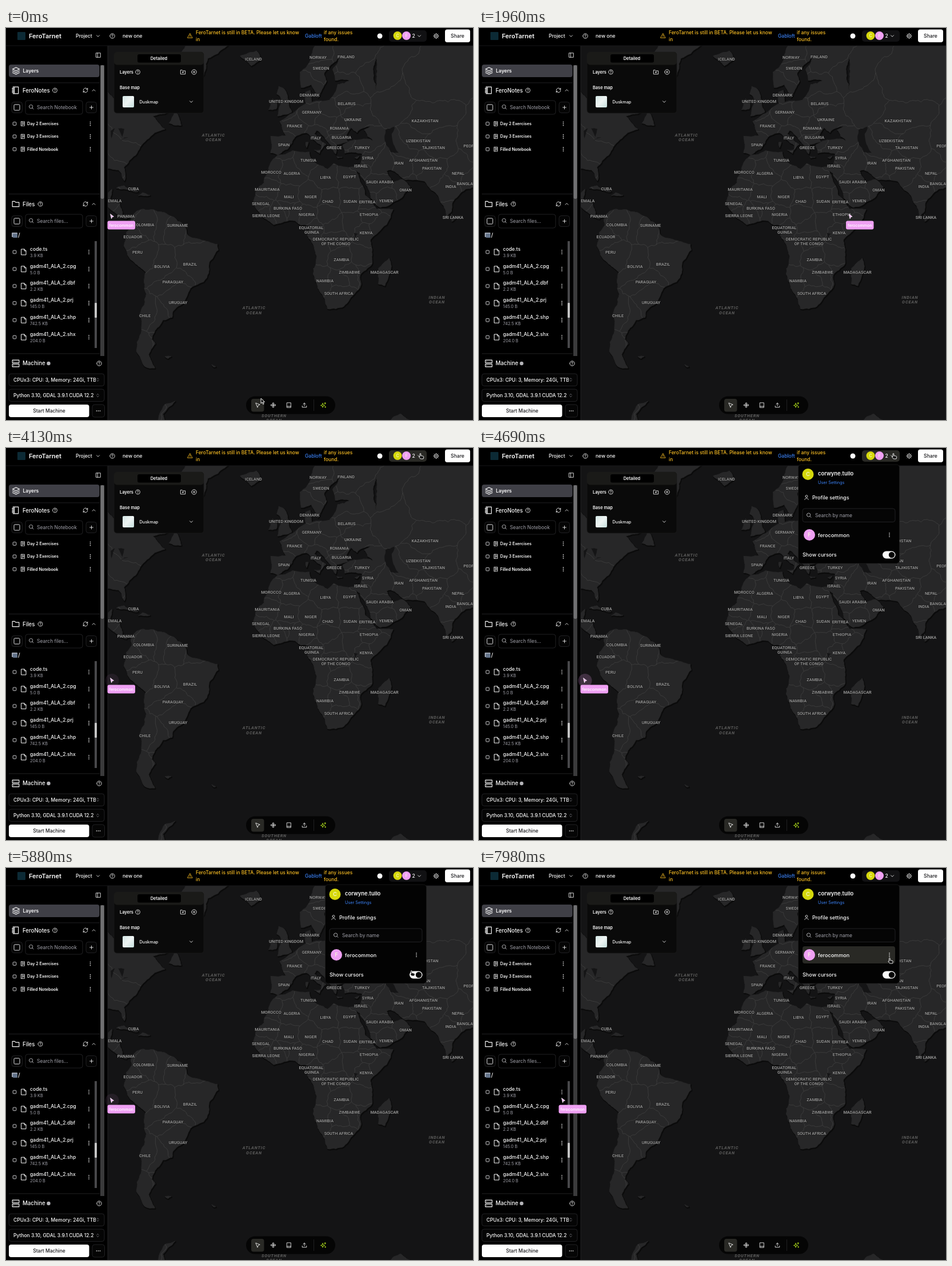
Animation, 817 px wide and 686 px high, one loop 8000 ms. Source, as an HTML page:

```html
<!DOCTYPE html>
<html lang="en">
<head>
<meta charset="utf-8">
<title>Map workspace</title>
<style>
html,body{margin:0;width:100%;height:100%;overflow:hidden;background:#000}
svg{display:block;width:817px;height:686px;font-family:Inter,Roboto,sans-serif}
.map{font-family:Roboto,"Liberation Sans",sans-serif;font-size:7.3px;font-weight:500;fill:#a2a2a2;text-anchor:middle;paint-order:stroke;stroke:#181818;stroke-width:1.2px}
.sea{font-style:italic;font-weight:700;letter-spacing:.9px;fill:#5c5c5c}
</style>
</head>
<body>
<svg id="stage" viewBox="0 0 817 686"></svg>
<script>
// ---- Map: coasts are a few "lon,lat" points, roughened by seeded noise ----
let seed = 7;
const rand = () => (seed = seed * 16807 % 2147483647) / 2147483647 - .5;
const project = p => {
  const [lon, lat] = p.split(',').map(Number);
  return [495 + 3.556 * lon, 360 - 203.7 * Math.log(Math.tan(Math.PI / 4 + lat * Math.PI / 360))];
};
const rough = (a, b, amount) => {
  const dx = b[0] - a[0], dy = b[1] - a[1];
  if (Math.hypot(dx, dy) < 5) return [b];
  const k = rand() * amount, m = [(a[0] + b[0]) / 2 - dy * k, (a[1] + b[1]) / 2 + dx * k];
  return [...rough(a, m, amount), ...rough(m, b, amount)];
};
const path = pts => 'M' + pts.map(p => p[0].toFixed(1) + ' ' + p[1].toFixed(1)).join('L');
const area = s => {
  const pts = s.split(' ').map(project);
  return path(pts.flatMap((p, i) => rough(p, pts[(i + 1) % pts.length], .2))) + 'Z';
};

const africa = '-6,35.8 10,37.3 11,34 19,30.3 22,32.7 32,31.2 35.5,24 37.5,18.5 43.2,12 51.2,11.8 48,4.5 40,-3 40.7,-15 35,-20 35.5,-23.8 32.5,-28 27,-33.6 19,-34.6 15,-27 12,-17 13.7,-11 9,-1 9.7,4 6,4.3 3,6.4 -7.5,4.4 -13,8.5 -17.4,14.7 -16.4,20 -10,29.5 -9,33';
const southAmerica = '-77.5,8.5 -75,11 -71.5,12 -62,10.5 -52,4.7 -50,-.5 -44,-2.7 -35.2,-5.2 -34.8,-8 -39,-13.5 -39.5,-19 -42,-23 -48.5,-26 -53,-33 -57,-35.5 -57.5,-38 -62,-39 -65,-42 -67.5,-46 -65.8,-47.6 -69,-51 -66,-55 -71,-54.5 -75,-50 -73.5,-37 -70.3,-18.5 -76,-14 -81.2,-6 -80,.7 -77.2,4';
const europe = '29,41.2 23.5,40.3 23,36.5 19.4,41 13.5,45.3 12.4,44 18.3,40.2 15.8,38 16,39.8 8.8,44.4 3,43 -.5,38.5 -5.5,36.1 -9,37 -9,43.2 -1.5,43.4 -4.5,48.3 1.5,50.8 8.5,53.8 8.2,57 10.5,57.5 11,54.2 20,54.8 24,59 30,60 22.8,60 21.5,62.5 25,65.5 17.2,61.5 18.5,59.8 14.3,55.5 11,59 6,58.2 5.5,62 14,68 16,69.5 46,70 46,47.2 36,46 33.5,44.5 30.5,46.2 28,43';
const asia = '29.2,41.2 35,42 41.5,41.5 37,45.4 45,47.5 45,70 96,70 96,21 91,22.5 87,21.5 80.3,15 80,11 77.5,8 72.8,19 70,21 66.8,25 57.3,25.6 50,30 48,29.5 51.5,24.5 56,25.8 59.7,22.5 55,17.2 45,12.8 43,14 39,21.5 35,28.5 32.5,30 32,31.3 34.3,31.4 36,36.7 27.5,36.8 26.5,40';
const northAmerica = '-96,29.5 -84,30 -81,25.2 -81.3,31 -75.5,36 -70,42 -66,44.5 -61,45.7 -65,48.5 -67,50 -56,52.3 -62,58 -70,61 -78,62 -79,52 -93,59 -96,70';
const centralAmerica = '-96,18.5 -91,19 -87,21.4 -88,15.8 -83.3,15 -82,9 -77.3,8.7 -80,7.3 -85.7,10.5 -96,16';
const britain = '-5.5,50 1.3,51.2 0,53 -2,57.6 -5,58.5 -6,56.5 -3,54.5 -5,51.8';
const ireland = '-10,52 -6.3,52.2 -6,54 -8,55.2';
const iceland = '-24,65.5 -16,66.5 -13.7,65 -18.5,63.4';
const greenland = '-50,70 -53,66 -48,61 -43.5,60 -40,65 -22,70';
const newfoundland = '-59,47.7 -53,47 -56,51.5';
const cuba = '-84.9,21.9 -81,23 -74.2,20.2 -78,20.8';
const hispaniola = '-74,18.4 -72,19.8 -68.4,18.6';
const madagascar = '49.3,-12 50.4,-15.8 47.2,-24.8 44,-24 44,-17';
const ceylon = '80,9.7 81.8,7.5 80.2,6';
const sicily = '12.5,38 15.6,38.2 15,36.7';
const sardinia = '8.3,41 9.6,41 8.7,39';
const crete = '23.6,35.5 26.2,35.2 24,34.9';
const cyprus = '32.4,35 34.5,35.6 33.5,34.6';
const falklands = '-61,-51.6 -58,-51.6 -59.5,-52.2';
const southGeorgia = '-38,-54 -36,-54.6 -37,-54.7';
const peninsula = '-56,-63.3 -61,-64 -65,-68 -70,-69 -60,-70 -62,-66';
const antarctica = '46,-69 50,-67.2 55,-66 60,-67.4 70,-68.5';
const lands = [africa, southAmerica, europe, asia, northAmerica, centralAmerica, britain, ireland, iceland, greenland, newfoundland, cuba, hispaniola, madagascar, ceylon, sicily, sardinia, crete, cyprus, falklands, southGeorgia, peninsula, antarctica];
const caspian = '47.5,45.5 52,46.5 50.5,44 54,37 50,37.3 47,43';
const victoria = '32,.4 34,0 32.4,-2.4';
const huron = '-84,46 -81,45.8 -82,43';
const erie = '-83,41.5 -79,42.8 -81,42.7';
const michigan = '-87.5,42 -85.5,46 -87.7,45';

const north = 'ICELAND 433 54|NORWAY 546 51|FINLAND 595 50|SWEDEN 551 70|DENMARK 531 117|UNITED KINGDOM 490 128|BELARUS 596 132|GERMANY 535 147|UKRAINE 607 160|FRANCE 505 171|ROMANIA 583 175|ITALY 542 192|BULGARIA 587 191|SPAIN 486 204|GREECE 574 209';
const east = "KAZAKHSTAN 733 162|TURKEY 623 209|UZBEKISTAN 721 197|TAJIKISTAN 748 209|PEOPLE'S REPUBLIC 834 206|SYRIA 633 227|ISRAEL 621 241|IRAN 687 236|AFGHANISTAN 730 231|PAKISTAN 745 245|SAUDI ARABIA 654 269|NEPAL 791 254|INDIA 778 277|BANGLADESH 812 272|OMAN 699 283|YEMEN 665 302|SRI LANKA 782 331";
const south = 'TUNISIA 529 231|MOROCCO 464 252|ALGERIA 500 254|LIBYA 559 261|EGYPT 601 260|MAURITANIA 457 282|MALI 495 295|NIGER 533 295|CHAD 563 303|SUDAN 602 303|ERITREA 632 304|SENEGAL 446 307|BURKINA FASO 493 315|NIGERIA 526 326|SIERRA LEONE 455 328|ETHIOPIA 635 326|EQUATORIAL 534 349|KENYA 630 358|DEMOCRATIC REPUBLIC 577 369|ZAMBIA 587 405|ZIMBABWE 601 427|MADAGASCAR 662 427|NAMIBIA 558 442|SOUTH AFRICA 582 464';
const west = 'CUBA 223 281|GUATEMALA 181 302|PANAMA 210 329|COLOMBIA 241 344|SURINAME 300 345|ECUADOR 222 365|PERU 230 392|BRAZIL 322 413|BOLIVIA 273 417|PARAGUAY 292 444|URUGUAY 301 480|CHILE 243 503';
const second = 'GUINEA 535 357|OF THE CONGO 577 377';
const seas = 'ATLANTIC 363 187|OCEAN 363 195|ATLANTIC 434 489|OCEAN 434 498|INDIAN 754 471|OCEAN 754 479|SOUTHERN 469 678|OCEAN 469 686';
const unnamed = 'a 262 508|b 268 555|c 232 555|d 270 340|e 320 345|f 562 325|g 575 345|h 620 400|i 545 395|j 580 440|k 625 425|l 652 345|m 606 340|n 475 325|o 506 322|p 645 80|q 680 125|r 740 95|s 655 240|t 705 212|u 560 160|v 565 143|w 590 105|x 204 215|y 188 235|z 218 195';
const read = list => list.split('|').map(s => {
  const [, name, x, y] = s.match(/^(.*) (\d+) (\d+)$/);
  return { name, x: +x, y: +y };
});
const labels = (list, cls) => read(list).map(p => `<text class="${cls}" x="${p.x}" y="${p.y + 2.6}">${p.name}</text>`).join('');

// Borders run halfway between neighbouring places.
const borders = () => {
  const pts = [north, east, south, west, unnamed].flatMap(read);
  let d = '';
  pts.forEach((a, i) => pts.slice(i + 1).forEach(b => {
    const mx = (a.x + b.x) / 2, my = (a.y + b.y) / 2, ux = a.y - b.y, uy = b.x - a.x;
    let lo = -9, hi = 9;
    for (const c of pts) {
      if (c === a || c === b) continue;
      const gx = c.x - a.x, gy = c.y - a.y;
      const slope = ux * gx + uy * gy;
      const rest = gx * ((a.x + c.x) / 2 - mx) + gy * ((a.y + c.y) / 2 - my);
      if (slope > 0) hi = Math.min(hi, rest / slope);
      else if (slope < 0) lo = Math.max(lo, rest / slope);
      else if (rest < 0) hi = lo;
      if (hi <= lo) return;
    }
    const p = [mx + ux * lo, my + uy * lo], q = [mx + ux * hi, my + uy * hi];
    if (Math.hypot(q[0] - p[0], q[1] - p[1]) < 1500) d += path([p, ...rough(p, q, .35)]);
  }));
  return d;
};
const map = () => {
  const land = lands.map(area).join('');
  return `<clipPath id="land"><path d="${land}"/></clipPath><g clip-path="url(#view)">${rect(178, 31, 639, 655, '#141415')}
    <path d="${land}" transform="translate(1 1.5)" fill="none" stroke="#0b0b0b" stroke-width="2.5" stroke-linejoin="round"/>
    <path d="${land}" fill="#272728" stroke="#272728" stroke-linejoin="round"/>
    <path d="${borders()}" clip-path="url(#land)" fill="none" stroke="#404041" stroke-width=".8" stroke-linejoin="round"/>
    <path d="${[caspian, victoria, huron, erie, michigan].map(area).join('')}" fill="#151516"/>
    ${[north, east, south, west, second].map(s => labels(s, 'map')).join('')}${labels(seas, 'map sea')}</g>`;
};

// ---- Interface helpers ----
const text = (x, y, s, size = 8.5, fill = '#fafafa', weight = 500, extra = '') =>
  `<text x="${x}" y="${y}" font-size="${size}" fill="${fill}" font-weight="${weight}" ${extra}>${s}</text>`;
const mid = (x, y, s, size, fill, weight) => text(x, y, s, size, fill, weight, 'text-anchor="middle"');
const rect = (x, y, w, h, fill, r = 0, stroke = 'none', extra = '') =>
  `<rect x="${x}" y="${y}" width="${w}" height="${h}" rx="${r}" fill="${fill}" stroke="${stroke}" ${extra}/>`;
const dot = (x, y, r, fill) => `<circle cx="${x}" cy="${y}" r="${r}" fill="${fill}"/>`;
const ring = (x, y, r) => `M${x - r} ${y}a${r} ${r} 0 1 0 ${2 * r} 0a${r} ${r} 0 1 0 ${-2 * r} 0`;
const page = 'M4 2h16v20H4Z', disc = ring(12, 12, 10), dir = 'M2 20V4h7l3 3h10v13Z';
const icons = {
  down: 'M6 9l6 6 6-6', up: 'M6 15l6-6 6 6', plus: 'M5 12h14M12 5v14',
  help: disc + 'M9 9a3 3 0 0 1 6 1c0 2-3 2-3 4M12 17v.5', addCircle: disc + 'M8 12h8M12 8v8',
  warn: 'M12 3L22 21H2ZM12 9v5M12 17v.5', side: 'M3 3h18v18H3ZM9 3v18',
  layers: 'M12 2L22 7 12 12 2 7ZM2 12l10 5 10-5M2 17l10 5 10-5',
  book: page + 'M8 2v20M1 7h5M1 12h5M1 17h5', note: page + 'M8 2v20M11 7h6M11 11h6M11 15h6',
  sync: 'M3 12a9 9 0 0 1 15-7L21 8V3M21 8h-5M21 12a9 9 0 0 1-15 7L3 16v5M3 16h5',
  search: ring(11, 11, 8) + 'M17 17l5 5', folder: dir, addFolder: dir + 'M12 10v6M9 13h6',
  file: 'M4 2h10l6 6v14H4ZM14 2v6h6', server: 'M2 2h20v8H2ZM2 14h20v8H2ZM6 6h.5M6 18h.5',
  sort: 'M7 15l5 5 5-5M7 9l5-5 5 5', user: ring(12, 7, 5) + 'M4 22c0-9 16-9 16 0',
  gear: ring(12, 12, 3) + ring(12, 12, 8) + 'M12 1v3M12 20v3M1 12h3M20 12h3M4 4l2 2M18 18l2 2M4 20l2-2M18 6l2-2',
  arrow: 'M4 3l17 7-7 3-3 8Z', hub: ring(12, 5, 3) + ring(12, 19, 3) + ring(5, 12, 3) + ring(19, 12, 3) + 'M12 8v8M8 12h8',
  pad: page + 'M4 17h16', upload: 'M3 15v6h18v-6M12 15V3M7 8l5-5 5 5',
  spark: 'M10 5l2 6 6 2-6 2-2 6-2-6-6-2 6-2ZM19 2v6M16 5h6M20 17v4M18 19h4'
};
const icon = (name, x, y, size = 10, color = '#fafafa') =>
  `<path d="${icons[name]}" transform="translate(${x - size / 2} ${y - size / 2}) scale(${size / 24})" fill="none" stroke="${color}" stroke-width="2" stroke-linecap="round" stroke-linejoin="round"/>`;
const more = (x, y) => [-3, 0, 3].map(d => dot(x, y + d, .85, '#fafafa')).join('');
const check = (x, y) => rect(x - 2.8, y - 2.8, 5.6, 5.6, 'none', 1, '#e4e4e7', 'stroke-width=".9"');
const box = (x, y, w, h) => rect(x, y, w, h, '#050505', 4, '#29292c', 'stroke-width=".8"');
const rule = y => rect(5, y, 159, .8, '#29292b');
const avatar = (x, y, r, fill, s) => dot(x, y, r, fill) + mid(x, y + r * .33, s, r * .95, '#f7f7d8', 500);
const YELLOW = '#d6d80c', PINK = '#efa0f3', AMBER = '#fbbf24', GREY = '#a1a1aa', GUEST = 'ferocommon';

const header = () => rect(0, 0, 817, 31, '#000') + rect(0, 30.6, 817, .8, '#1d1d1f') +
  rect(20, 7, 14, 14, '#0c2a35', 1) + text(40, 17.8, 'FeroTarnet', 11, '#fafafa', 600) +
  text(122, 17, 'Project') + icon('down', 161, 14) + icon('help', 186, 14) + text(204, 17, 'new one') +
  icon('warn', 322, 13.5, 10, AMBER) + text(332, 10.5, 'FeroTarnet is still in BETA. Please let us know', 8.45, AMBER) + text(332, 22.5, 'in', 8.45, AMBER) +
  text(523, 16.5, 'Gabloft', 8.5, '#3b82f6') + text(556, 10.5, 'if any issues', 8.45, AMBER) + text(556, 22.5, 'found.', 8.45, AMBER) +
  dot(654, 14, 4.5, '#fafafa') + rect(670, 4, 66, 20, '#111113', 5, 'none', 'id="people"') +
  avatar(685, 13.5, 7.5, YELLOW, 'C') + avatar(700.5, 13.5, 7.5, PINK, 'F') + text(710.5, 16.7, '2') + icon('down', 723, 14) +
  icon('gear', 752.5, 14) + rect(768, 2.5, 44, 22.5, '#fff', 4) + mid(790, 16.8, 'Share', 8.6, '#18181b');

const section = (y, ic, name, hint) => icon(ic, 17, y, 14) + text(29, y + 3.5, name, 9.7) + icon('help', hint, y, 9.5) + icon('sync', 139, y) + icon('up', 153.5, y);
const searchRow = (y, s) => box(10, y - 9.5, 18.5, 19) + rect(14, y - 5, 10, 10, 'none', 1.5, '#e4e4e7') +
  text(54, y + 3.3, s, 8.5, GREY, 400, 'clip-path="url(#field)"') + rect(34, y - 12, 100, 24, 'none', 4, '#29292c', 'stroke-width=".8"') +
  icon('search', 44, y - 1, 9.5, '#d4d4d8') + box(140, y - 9.5, 18.5, 19) + icon('plus', 149.5, y);
const notes = ['Day 2 Exercises', 'Day 3 Exercises', 'Filled Notebook'];
const files = ['code.ts|3.9 KB', 'gadm41_ALA_2.cpg|5.0 B', 'gadm41_ALA_2.dbf|2.2 KB', 'gadm41_ALA_2.prj|145.0 B', 'gadm41_ALA_2.shp|742.5 KB', 'gadm41_ALA_2.shx|204.0 B'];
const noteRow = (s, i) => {
  const y = 167.5 + i * 22.3;
  return check(15, y) + icon('note', 29.5, y, 9) + text(37, y + 2.6, s, 7.2, '#fafafa', 600) + more(147.5, y);
};
const fileRow = (s, i) => {
  const y = 392 + i * 29.8, [name, size] = s.split('|');
  return check(15, y) + icon('file', 31, y, 12) + text(42, y - 2.2, name, 8.6) + text(42, y + 8.8, size, 7.3, GREY, 400) + more(145, y);
};
const sidebar = () => rect(0, 31, 178, 655, '#000') + rect(177.6, 31, .8, 655, '#29292b') +
  icon('side', 161.5, 47.5) + rect(5, 64, 158.5, 22, '#3f3f46', 4) + icon('layers', 17.5, 75, 14.5) + text(29.5, 78.2, 'Layers', 8.6, '#fafafa', 600) +
  rule(95.5) + section(109, 'book', 'FeroNotes', 85.5) + searchRow(139, 'Search Notebook') + notes.map(noteRow).join('') +
  rule(290) + section(308, 'folder', 'Files', 60) + searchRow(338, 'Search files...') +
  rect(10, 358, 10, 8, '#9ca3af', 1) + rect(12, 360, 8, 7, '#64748b', 1) + text(21, 366, '/', 10) + files.map(fileRow).join('') +
  rect(155, 373, 4, 187, '#48484a') + rect(155, 481, 4, 26, '#c4c4c4', 1) +
  rect(165, 65, 7, 509, '#3a3a3b') + rect(165.5, 65, 6, 234, '#707072', 3) +
  rule(569.5) + icon('server', 17, 587, 14) + text(29, 590.3, 'Machine', 9.7) + dot(74.5, 587, 3.2, '#b4b4b8') + icon('help', 163, 587) +
  box(5, 605, 167, 21.5) + text(13, 618.6, 'CPUx3: CPU: 3, Memory: 24Gi, TTBE', 8.5, '#fafafa', 500, 'clip-path="url(#cpu)"') + icon('sort', 160.5, 615.5, 8, GREY) +
  box(5, 632, 167, 21.5) + text(13, 645.8, 'Python 3.10, GDAL 3.9.1 CUDA 12.2') + icon('sort', 160.5, 643, 8, GREY) +
  rect(5, 659, 140.5, 22, '#fff', 4) + mid(75.5, 673, 'Start Machine', 8.5, '#18181b', 500) +
  box(151, 659, 21.5, 22) + [-3, 0, 3].map(d => dot(161.5 + d, 670, .85, '#fafafa')).join('');

const panel = () => rect(189, 42, 157, 107, '#0a0a0a', 5, '#1c1c1c', 'stroke-width=".7"') + rect(189, 42, 157, 22.5, '#1a1a18', 5) + rect(230, 46, 76, 14.5, '#000', 3) +
  mid(267.5, 56, 'Detailed', 7.4, '#fafafa', 600) + text(199, 79.5, 'Layers', 7.4, '#fafafa', 600) + icon('help', 230.5, 77, 9.5) + icon('addFolder', 309.5, 77) + icon('addCircle', 329, 77) +
  text(199, 106.6, 'Base map', 7.4, '#fafafa', 600) + rect(204, 119, 20, 20, 'url(#thumb)', 2) + text(233.5, 131.6, 'Duskmap', 7.3) + icon('down', 324, 129);

const toolbar = () => rect(420, 644.5, 156, 31, '#050505', 15.5) + rect(429, 649, 22.5, 22.5, '#292925', 4) +
  icon('arrow', 440.5, 660) + icon('hub', 467.5, 660) + icon('pad', 495, 660) + icon('upload', 522, 660) + rect(538, 650, .8, 20, '#29292b') + icon('spark', 555, 660, 11, '#b6e61d');

const menu = () => '<g id="menu">' + rect(558.5, 29, 177, 173, '#030303', 5, '#1f1f1f', 'stroke-width=".7"') +
  avatar(575.5, 46, 10, YELLOW, 'C') + text(593, 47.5, 'corwyne.tullo', 9.4, '#fafafa', 600) + text(593, 62.5, 'User Settings', 7.3, '#3b82f6', 400) +
  icon('user', 573, 86.5, 9.5) + text(583, 89.8, 'Profile settings', 9) + box(566, 106, 162, 23.5) + icon('search', 577, 117.5, 9.5, '#d4d4d8') + text(588, 121, 'Search by name', 8.5, GREY, 400) +
  rect(566, 137, 162, 30, '#292925', 4, 'none', 'id="row"') + avatar(578, 152, 10, PINK, 'F') + text(593, 155.5, GUEST, 9.1) + more(718, 152) +
  text(566, 190.3, 'Show cursors', 9.1) + rect(706, 180.5, 22.5, 13, '#fafafa', 6.5, 'none', 'id="track"') + '<circle id="knob" cy="187" r="5.2" fill="#050505"/></g>';

const cursors = () => `<g id="guest"><circle id="pulse" cx="3" cy="4.5" r="12" fill="${PINK}"/>
  <path d="M0 0L6 4.5 3.3 5.3 2 8.3Z" fill="#f5b8f7" stroke="#fff" stroke-width=".7" stroke-linejoin="round"/>
  ${rect(-5, 12, 48.5, 15, PINK, 3)}${mid(19.2, 22.1, GUEST, 7, '#fff', 500)}</g>
  <g id="mine" stroke="#fff" stroke-width=".9" stroke-linejoin="round" fill="#111">
  <path id="tip" d="M0 0V9L2.2 7 3.7 10.5 5.2 9.8 3.7 6.4H6.5Z"/>
  <path id="hand" d="M0 1Q1 0 1.8 1V4.5L5.5 5.2Q7 5.6 6.7 7.2L6 10H1.2L-1.6 6.6Q-1.2 5.4 0 6.3Z"/></g>`;

const clip = (id, x, y, w, h) => `<clipPath id="${id}"><rect x="${x}" y="${y}" width="${w}" height="${h}"/></clipPath>`;
const $ = id => document.getElementById(id);
$('stage').innerHTML = clip('view', 178, 31, 639, 655) + clip('cpu', 12, 605, 145, 21) + clip('field', 50, 100, 74, 300) +
  '<linearGradient id="thumb" x2="1" y2="1"><stop stop-color="#d4e8e6"/><stop offset=".5" stop-color="#eef4f3"/><stop offset="1" stop-color="#c6dfdd"/></linearGradient>' +
  map() + panel() + toolbar() + sidebar() + header() + menu() + cursors();

// ---- Motion: [ms, ...values] ----
const guestPath = [[0, 182.5, 325.5], [700, 251, 445], [770, 251, 445], [980, 254, 464], [1119, 254, 464], [1120, 329, 481], [1190, 329, 481], [1610, 590, 420], [1820, 678, 340], [1960, 647, 325.5], [2380, 647, 325.5], [2660, 250, 409], [2800, 182.5, 402.5], [7279, 182.5, 402.5], [7280, 144.5, 402.5]];
const minePath = [[0, 446, 648], [2940, 446, 648], [3220, 696.5, 386], [3780, 736, 12], [3990, 724, 9], [4760, 724, 9], [5250, 716, 100], [5530, 712, 150], [5740, 708.5, 179], [6440, 708.5, 179], [6860, 716, 184], [7210, 716, 184], [7770, 717.5, 157]];
const pulse = [[490, 0], [700, .1], [980, 0], [3850, 0], [4270, .1], [4690, .2], [5250, .16], [5880, .08], [6300, 0], [7350, 0], [7560, .1], [7910, 0]];

const at = (track, t) => {
  const i = track.findIndex(k => k[0] > t);
  if (i === 0) return track[0].slice(1);
  if (i < 0) return track[track.length - 1].slice(1);
  const a = track[i - 1], b = track[i];
  const u = (t - a[0]) / (b[0] - a[0]), e = u * u * (3 - 2 * u);
  return a.slice(1).map((v, k) => v + (b[k + 1] - v) * e);
};
const show = (id, on) => $(id).setAttribute('visibility', on ? 'inherit' : 'hidden');
const move = (id, [x, y]) => $(id).setAttribute('transform', `translate(${x.toFixed(2)} ${y.toFixed(2)})`);

function draw() {
  const t = Math.floor(performance.now() % 8000 / 70) * 70;
  const mine = at(minePath, t), [x, y] = mine;
  const open = t >= 4270, on = t < 6580 || t >= 7280;
  const overPeople = t > 3000 && y < 24 && x < 736;
  const overRow = open && y > 137 && y < 167;
  const hand = overPeople || overRow || (open && y > 175 && y < 200);
  move('guest', at(guestPath, t));
  move('mine', mine);
  show('guest', on);
  show('mine', t < 70 || t >= 3010);
  show('menu', open);
  show('row', overRow);
  show('hand', hand);
  show('tip', !hand);
  $('pulse').setAttribute('opacity', at(pulse, t)[0]);
  $('people').setAttribute('fill', overPeople ? '#292925' : '#111113');
  $('track').setAttribute('fill', on ? '#fafafa' : '#3f3f46');
  $('knob').setAttribute('cx', on ? 722 : 712.5);
  requestAnimationFrame(draw);
}
draw();
</script>
</body>
</html>
```
